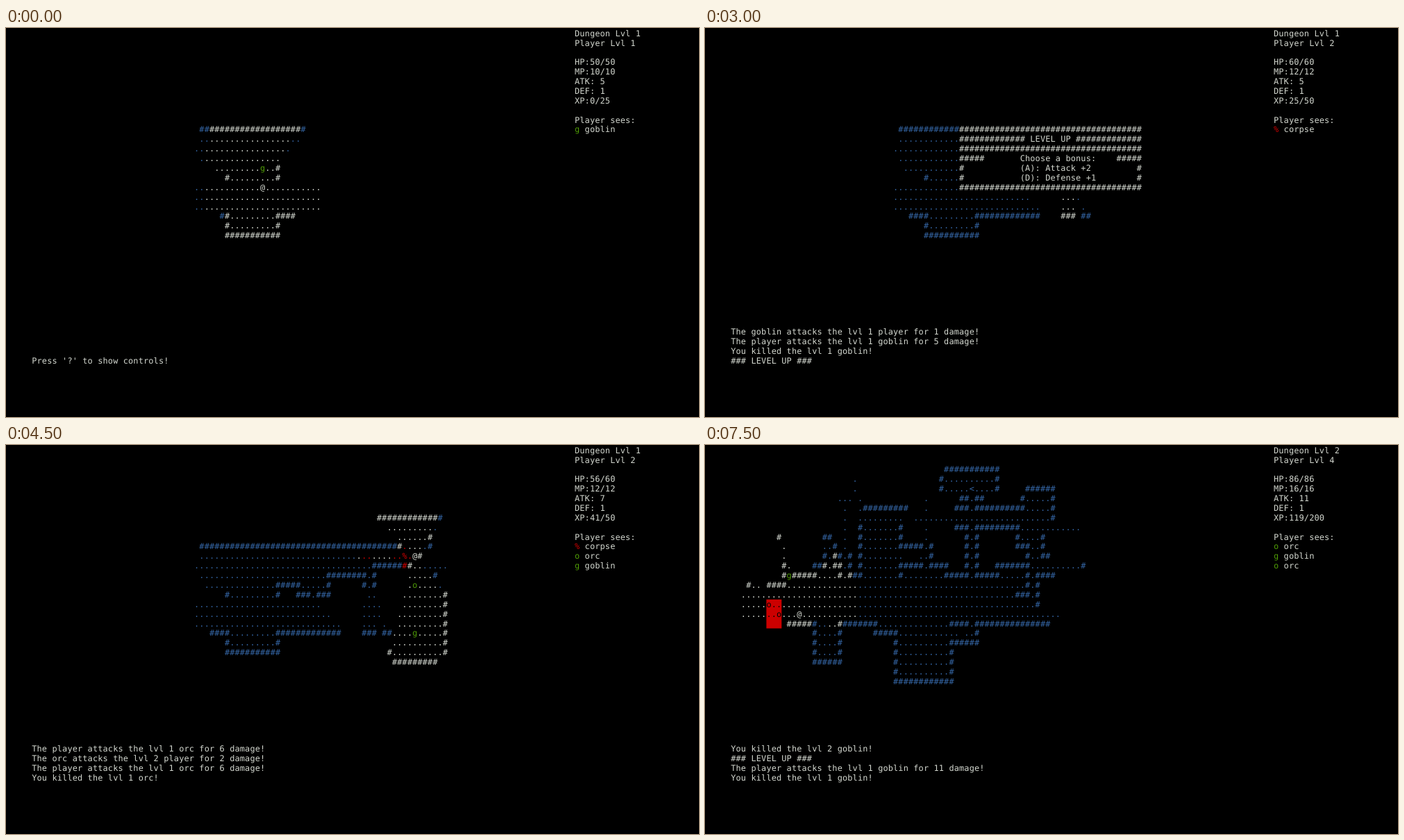
Write an HTML page that moves like this. It is 998 px wide and 561 px high and loops after 9 s.

```html
<!DOCTYPE html>
<html lang="en">
<head>
<meta charset="utf-8">
<title>Dungeon crawl</title>
<style>
html, body { margin: 0; width: 100%; height: 100%; overflow: hidden; background: #000; }
svg { display: block; width: 100vw; height: 100vh; }
text {
  font: 16.3px "DejaVu Sans Mono", monospace;
  text-rendering: geometricPrecision;
  white-space: pre;
}
</style>
</head>
<body>
<svg id="term" viewBox="0 0 1366 768" preserveAspectRatio="none"></svg>
<script>
const CW = 10, CH = 19, PAD = 1, ASCENT = 15, HOLD = 1500;
const COLORS = { W: '#d3d7cf', B: '#3465a4', G: '#4e9a06', R: '#cc0000', K: '#000' };

// Map lines: row, column, then runs of [colour]glyph[count]; "_" is a gap.
const FIRST = `
10 38 B#2W#18B#
11 38 B.2W.16B.2
12 37 B.2W.16B.
13 38 B.W.15
14 41 W.9GgW.2#
15 43 W#.9#
16 37 B.2W.11@.11
17 37 B.2W.23
18 37 B.2W.23
19 42 B#W#.9#4
20 43 W#.9#
21 43 W#11`;

const CORPSE = `
10 38 B#12W#9B#
11 38 B.5W.23
12 37 B.6W.11@.11
13 38 B.5W.20#
14 39 B.4W.6R.%W.2#5.5#
15 43 W#.5R.W.R.B.#_6W.#
16 37 B.6W.8B.11
17 37 B.7W.7B.11
18 37 B.7W.6B.12
19 40 B#4.W.4B.4#7
20 43 B#.2W.2B.5#
21 43 B#4W#B#6`;

const HALL = `
10 38 B#12
11 38 B.12
12 37 B.13
13 38 B.12
14 39 B.11
15 43 B#.6
16 37 B.13
17 37 B.27_6W.3B.
18 37 B.29_4W.3_B.
19 40 B#4.9#13_4W#3_B#2
20 43 B#.9#
21 43 B#11`;

const ORCS = `
7 73 W#12B#
8 75 W.9B.
9 77 W.6#
10 38 B#39W#R.W.3B.#
11 38 B.31W.R.2W.4R.2%.W@#
12 37 B.35#6R#W#.2B.5
13 38 B.25#8.#_6W.5B#
14 39 B.14#5.5#_6#.#_6W.GoW.4B.
15 43 B#.9#_3#3.#3_7.2_5W.8#
16 37 B.25_8.4_4W.8#
17 37 B.27_6.4_3W.9#
18 37 B.29_4.3_._2W.9#
19 40 B#4.9#13_4#3_#2W.4GgW.5#
20 43 B#.9#_22W.10#
21 43 B#11_21W#.10#
22 76 W#9`;

const LEVEL2 = `
2 47 B#11
3 29 B._16#.10#
4 29 B._16#.5<.4#_5#6
5 26 B.3_._12._6#2.#2_7#.5#
6 27 B._2.#9_3._5#3.#10.5#
7 27 B._2.9_2.27#
8 27 B._2#.7#_4._5#3.#9.12
9 14 W#_8B#2_2._2#.7#_4._7#.#_7#.4#
10 15 W._7B.2#_._2#.7#5.#_6#.#_7#3.2#
11 15 W._7B#.W#B#.#_#.8_3.2#_6#.#_9#.2#2
12 15 W#._4B#2W#.#2B.#_#.7#5.#4_3#.#_3#7.10#
13 15 W#GgW#5.4#.#B#2.7#.8#5.#5.5#.#4
14 8 W#.2_#4.14B.33#.#
15 7 W.23B.31#3.#
16 7 W.5GoW.17B.35#
17 7 W.7GoW.3@.11B.40
18 16 W#5B#.2W.2#B#7.14#4.#15
19 21 B#.4#_6#5.12_.2#
20 21 B#.4#_10#.10#6
21 21 B#.4#_10#.10#
22 21 B#6_10#.10#
23 37 B#.10#
24 37 B#12`;

const hit = (who, n, foe = 'lvl 1 goblin') => `The ${who} attacks the ${foe} for ${n} damage!`;
const killed = foe => `You killed the ${foe}!`;
const pad = (n, s) => ' '.repeat(n) + s;

const RAID = {
  map: LEVEL2, stats: [2, 4, '86/86', '16/16', 11, '119/200'], sees: ['Go orc', 'Gg goblin', 'Go orc'],
  log: [killed('lvl 2 goblin'), '### LEVEL UP ###', hit('player', 11), killed('lvl 1 goblin')]
};

const SCENES = [
  { map: FIRST, stats: [1, 1, '50/50', '10/10', 5, '0/25'], sees: ['Gg goblin'],
    log: ["Press '?' to show controls!"] },
  { map: CORPSE, stats: [1, 1, '48/50', '10/10', 5, '12/25'], sees: ['R% corpse'],
    log: [hit('player', 5), hit('goblin', 1, 'lvl 1 player'), hit('player', 5), killed('lvl 1 goblin')] },
  { map: HALL, stats: [1, 2, '60/60', '12/12', 5, '25/50'], sees: ['R% corpse'],
    log: [hit('goblin', 1, 'lvl 1 player'), hit('player', 5), killed('lvl 1 goblin'), '### LEVEL UP ###'],
    popup: [null, '############ LEVEL UP ############', null,
      '####       Choose a bonus:    ####',
      pad(11, '(A): Attack +2'), pad(11, '(D): Defense +1'), null] },
  { map: ORCS, stats: [1, 2, '56/60', '12/12', 7, '41/50'], sees: ['R% corpse', 'Go orc', 'Gg goblin'],
    log: [hit('player', 6, 'lvl 1 orc'), hit('orc', 2, 'lvl 2 player'), hit('player', 6, 'lvl 1 orc'), killed('lvl 1 orc')] },
  { ...RAID,
    popup: [null, pad(13, 'Inventory'), null, pad(3, 'Life Potion'), pad(1, 'X Fire Scroll'),
      '', '', '', null, pad(1, '[space]: USE [d]: DROP [q]: EXIT'), null] },
  { ...RAID, fire: { row: 16, col: 12, rows: 3, cols: 3 } }
];

function el(name, attrs, parent) {
  const node = document.createElementNS('http://www.w3.org/2000/svg', name);
  for (const key in attrs) node.setAttribute(key, attrs[key]);
  return parent.appendChild(node);
}

function layout({ map, stats, sees, log, popup, fire }) {
  const grid = Array.from({ length: 40 }, () => []);
  const put = (row, col, str, color = 'W') =>
    [...str].forEach((ch, i) => { grid[row][col + i] = { ch, color }; });

  for (const line of map.trim().split('\n')) {
    const [row, start, runs] = line.split(' ');
    let col = +start, color = 'W';
    for (const [, c, ch, n] of runs.matchAll(/([A-Z]?)([^A-Z\d])(\d*)/g)) {
      color = c || color;
      const count = +n || 1;
      if (ch !== '_') put(row, col, ch.repeat(count), color);
      col += count;
    }
  }

  (popup || []).forEach((s, i) =>
    put(10 + i, 50, s === null ? '#'.repeat(36) : `#${s.padEnd(34)}#`));

  const [depth, level, hp, mp, atk, xp] = stats;
  [`Dungeon Lvl ${depth}`, `Player Lvl ${level}`, '', `HP:${hp}`, `MP:${mp}`, `ATK: ${atk}`,
    'DEF: 1', `XP:${xp}`, '', 'Player sees:'].forEach((s, i) => put(i, 112, s));
  sees.forEach((s, i) => {
    put(10 + i, 112, s[1], s[0]);
    put(10 + i, 114, s.slice(3));
  });
  log.forEach((s, i) => put(35 - log.length + i, 5, s));

  if (fire) {
    for (let r = 0; r < fire.rows; r++)
      for (let c = 0; c < fire.cols; c++) {
        const cell = grid[fire.row + r][fire.col + c];
        if (cell) cell.color = 'K';
      }
  }
  return grid;
}

function build(scene) {
  // The imperceptible turn keeps baselines from snapping to whole pixels.
  const g = el('g', { display: 'none', transform: `translate(${PAD} ${PAD}) rotate(.001)` }, term);
  const { fire } = scene;
  if (fire) {
    el('rect', { x: fire.col * CW, y: fire.row * CH, width: fire.cols * CW,
      height: fire.rows * CH, fill: COLORS.R }, g);
  }
  layout(scene).forEach((cells, row) => {
    let run = null;
    const flush = () => {
      if (run) {
        el('text', { x: run.xs.join(' '), y: row * CH + ASCENT, fill: COLORS[run.color] }, g)
          .textContent = run.str;
      }
      run = null;
    };
    for (let col = 0; col < cells.length; col++) {
      const cell = cells[col];
      if (!cell || (run && run.color !== cell.color)) flush();
      if (!cell) continue;
      run = run || { color: cell.color, str: '', xs: [] };
      run.str += cell.ch;
      run.xs.push(col * CW);
    }
    flush();
  });
  return g;
}

const term = document.getElementById('term');
const views = SCENES.map(build);

function draw(ms) {
  const now = Math.floor(ms / HOLD) % views.length;
  views.forEach((v, i) => v.setAttribute('display', i === now ? 'inline' : 'none'));
}

const start = performance.now();
function tick() {
  draw(performance.now() - start);
  requestAnimationFrame(tick);
}
tick();
</script>
</body>
</html>
```
